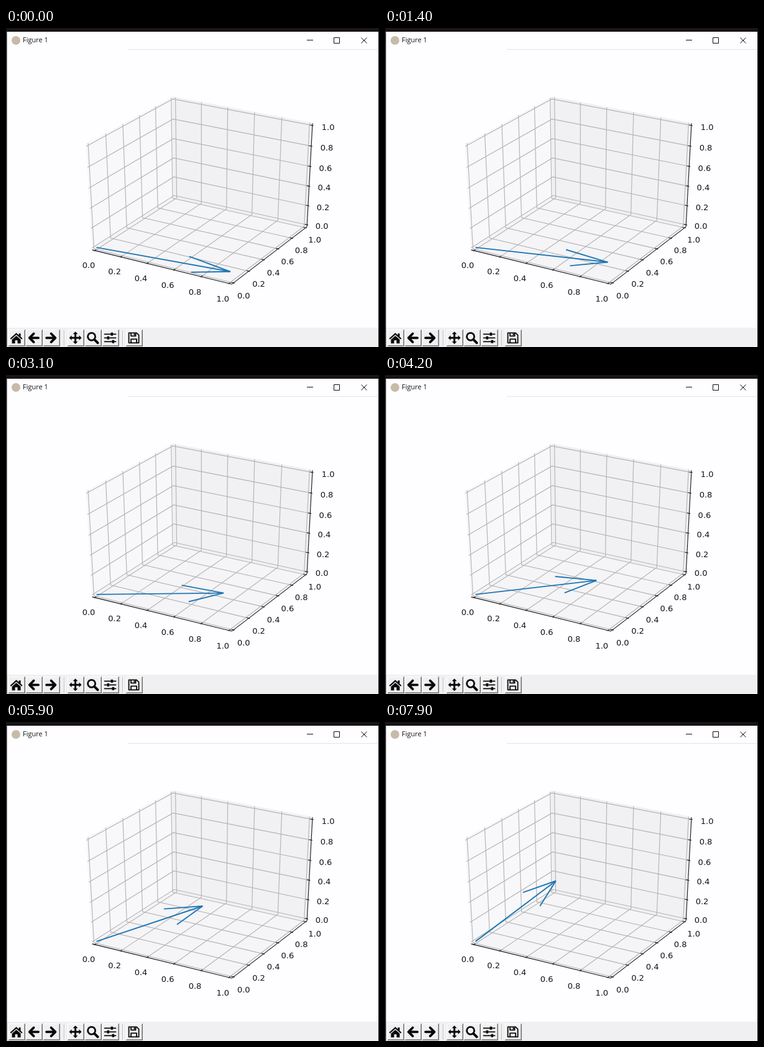
An HTML page with a canvas for the animation above (8 s loop, 600 by 513 pixels).

```html
<!DOCTYPE html>
<html lang="en">
<head>
<meta charset="utf-8">
<title>Figure 1</title>
<style>
html, body { margin: 0; width: 100%; height: 100%; overflow: hidden; background: #fefdff; }
canvas { display: block; }
</style>
</head>
<body>
<canvas id="stage" width="600" height="513"></canvas>
<script>
const ctx = document.getElementById('stage').getContext('2d');
const LOOP = 8000, STEP = 100;
const LO = -1 / 48, HI = 1 + 1 / 48;   // the panes sit just outside the unit cube
const TICKS = [0, 0.2, 0.4, 0.6, 0.8, 1];

// Perspective view: azimuth -60, elevation 30, distance 10
function project([x, y, z]) {
  x -= 0.5; y -= 0.5; z -= 0.5;
  const depth = 10 - (0.433 * x - 0.75 * y + 0.5 * z);
  const h = (0.866 * x + 0.5 * y) / depth;
  const v = (-0.25 * x + 0.433 * y + 0.866 * z) / depth;
  return [
    3.2 + 0.929 * (80 + (h + 0.095) * 2681.1),
    34.5 + 0.933 * (427.2 - (v + 0.095) * 1997.8)
  ];
}

function trace(points) {
  ctx.beginPath();
  for (const p of points) ctx.lineTo(...project(p));
}

function line(color, width, ...points) {
  trace(points);
  ctx.strokeStyle = color;
  ctx.lineWidth = width;
  ctx.stroke();
}

function pane(color, ...points) {
  trace(points);
  ctx.closePath();
  ctx.fillStyle = ctx.strokeStyle = color;
  ctx.lineWidth = 1;
  ctx.fill();
  ctx.stroke();
}

function rect(color, x, y, w, h) {
  ctx.fillStyle = color;
  ctx.fillRect(x, y, w, h);
}

function text(str, x, y, font, align) {
  ctx.font = font;
  ctx.textAlign = align;
  ctx.textBaseline = 'middle';
  ctx.fillStyle = '#151515';
  ctx.fillText(str, x, y);
}

function drawCube() {
  pane('rgba(243,241,245,.5)', [LO, LO, LO], [LO, HI, LO], [LO, HI, HI], [LO, LO, HI]);
  pane('rgba(230,228,232,.5)', [LO, HI, LO], [HI, HI, LO], [HI, HI, HI], [LO, HI, HI]);
  pane('rgba(237,236,239,.5)', [LO, LO, LO], [HI, LO, LO], [HI, HI, LO], [LO, HI, LO]);
  const grid = '#b4b3b5';
  for (const t of TICKS) {
    line(grid, 1.15, [t, LO, LO], [t, HI, LO], [t, HI, HI]);
    line(grid, 1.15, [HI, t, LO], [LO, t, LO], [LO, t, HI]);
    line(grid, 1.15, [LO, LO, t], [LO, HI, t], [HI, HI, t]);
  }
}

function drawAxes() {
  const black = '#1a1a1a', near = -0.11, far = 1.11;
  const inside = 0.0167, outside = 0.0083;
  line(black, 1.1, [LO, LO, LO], [HI, LO, LO]);
  line(black, 1.1, [HI, LO, LO], [HI, HI, LO]);
  line(black, 1.1, [HI, HI, LO], [HI, HI, HI]);
  const label = (t, point, dx, dy) => {
    const [x, y] = project(point);
    text(t.toFixed(1), x + dx, y + dy, '13px "DejaVu Sans", sans-serif', 'center');
  };
  for (const t of TICKS) {
    line(black, 1.1, [t, LO + inside, LO], [t, LO - outside, LO]);
    line(black, 1.1, [HI - inside, t, LO], [HI + outside, t, LO]);
    line(black, 1.1, [HI - inside, HI, t], [HI + outside, HI, t]);
    label(t, [t, near, near], 1.5, 2.8);
    label(t, [far, t, near], -3.6, 2.9);
    label(t, [far, far, t], -4.8, 6.6);
  }
}

// The arrow has length 1 and swings upwards in the plane y = 0
function drawArrow(ms) {
  const s = Math.floor(ms / STEP) * STEP / 1000;
  const deg = 4.85 + 3 * s + 0.54 * s * s - 0.021 * s ** 3;
  const polar = a => [Math.cos(a * Math.PI / 180), 0, Math.sin(a * Math.PI / 180)];
  const tip = polar(deg), blue = '#1f77b4';
  line(blue, 1.95, [0, 0, 0], tip);
  for (const turn of [-15, 15]) {
    const back = polar(deg + turn);
    line(blue, 1.95, tip, tip.map((c, i) => c - 0.3 * back[i]));
  }
}

function drawWindow() {
  rect('#fefdff', 0, 0, 600, 513);
  rect('#e4e3e5', 196, 34, 402, 1);
  rect('#f0eff1', 1, 482, 598, 31);
  rect('#191416', 0, 0, 600, 6);
  rect('#191416', 0, 0, 1.5, 513);
  rect('#191416', 599, 6, 1, 507);
  ctx.fillStyle = '#c8baa9';
  ctx.beginPath();
  ctx.arc(16, 20, 7, 0, 7);
  ctx.fill();
  text('Figure 1', 27, 20.5, '11px "Open Sans", sans-serif', 'left');
  ctx.strokeStyle = '#111';
  ctx.lineWidth = 1;
  ctx.stroke(new Path2D('M484 19.5h10M527.5 15.5h9v9h-9zM571.5 15.5l9 9m0-9l-9 9'));
}

// Icons are drawn around their own centre
const ARROW = 'M7.5 0H-6M0-6.8L-6.8 0L0 6.8';
const ICONS = [
  [17, 'M-10 1L0-8L4-4.4V-7H7V-1.7L10 1L8.5 2.5L0-5L-8.5 2.5ZM-7 2.8L0-3.3L7 2.8V9H2V4H-2V9H-7Z'],
  [45, ARROW, false, 3.8],
  [73, ARROW, true, 3.8],
  [112, 'M0-10L4-6H1.5V-1.5H6V-4L10 0L6 4V1.5H1.5V6H4L0 10L-4 6H-1.5V1.5H-6V4L-10 0L-6-4V-1.5H-1.5V-6H-4Z'],
  [140, 'M3 3L8 8', false, 4],
  [168, 'M-9-6H9M-9 0H9M-9 6H9', false, 1.8],
  [206, 'M-8-8H4.5L8-4.5V8H-8ZM-4.5-8V-3H3V-8M-4.5 8V2H4.5V8', false, 1.8]
];

function drawToolbar() {
  for (const x of [93, 187]) {
    rect('#bdbcbd', x, 486, 1, 25);
    rect('#ffffff', x + 1, 486, 1, 25);
  }
  for (const [x, shape, flip, stroke] of ICONS) {
    rect('#717071', x - 13, 485, 27, 27);
    rect('#ffffff', x - 13, 485, 26, 26);
    rect('#a9a8a9', x - 12, 486, 25, 25);
    rect('#f0eff1', x - 12, 486, 24, 24);
    ctx.save();
    ctx.translate(x - 0.4, 498.3);
    if (flip) ctx.scale(-1, 1);
    ctx.fillStyle = ctx.strokeStyle = '#080808';
    const path = new Path2D(shape);
    if (stroke) {
      ctx.lineWidth = stroke;
      ctx.lineJoin = ctx.lineCap = 'round';
      ctx.stroke(path);
    } else ctx.fill(path);
    if (x === 140) {
      ctx.lineWidth = 2.8;
      ctx.beginPath();
      ctx.arc(-2, -2, 6, 0, 7);
      ctx.stroke();
    }
    if (x === 168) {
      rect('#080808', 1, -8.5, 3.5, 5);
      rect('#080808', -5, -2.5, 3.5, 5);
      rect('#080808', 3, 3.5, 3.5, 5);
    }
    if (x === 206) rect('#080808', 0, -7, 2, 3);
    ctx.restore();
  }
}

function frame(now) {
  drawWindow();
  drawToolbar();
  drawCube();
  drawAxes();
  drawArrow((now - start) % LOOP);
  requestAnimationFrame(() => frame(performance.now()));
}

const start = performance.now();
frame(start);
</script>
</body>
</html>
```
